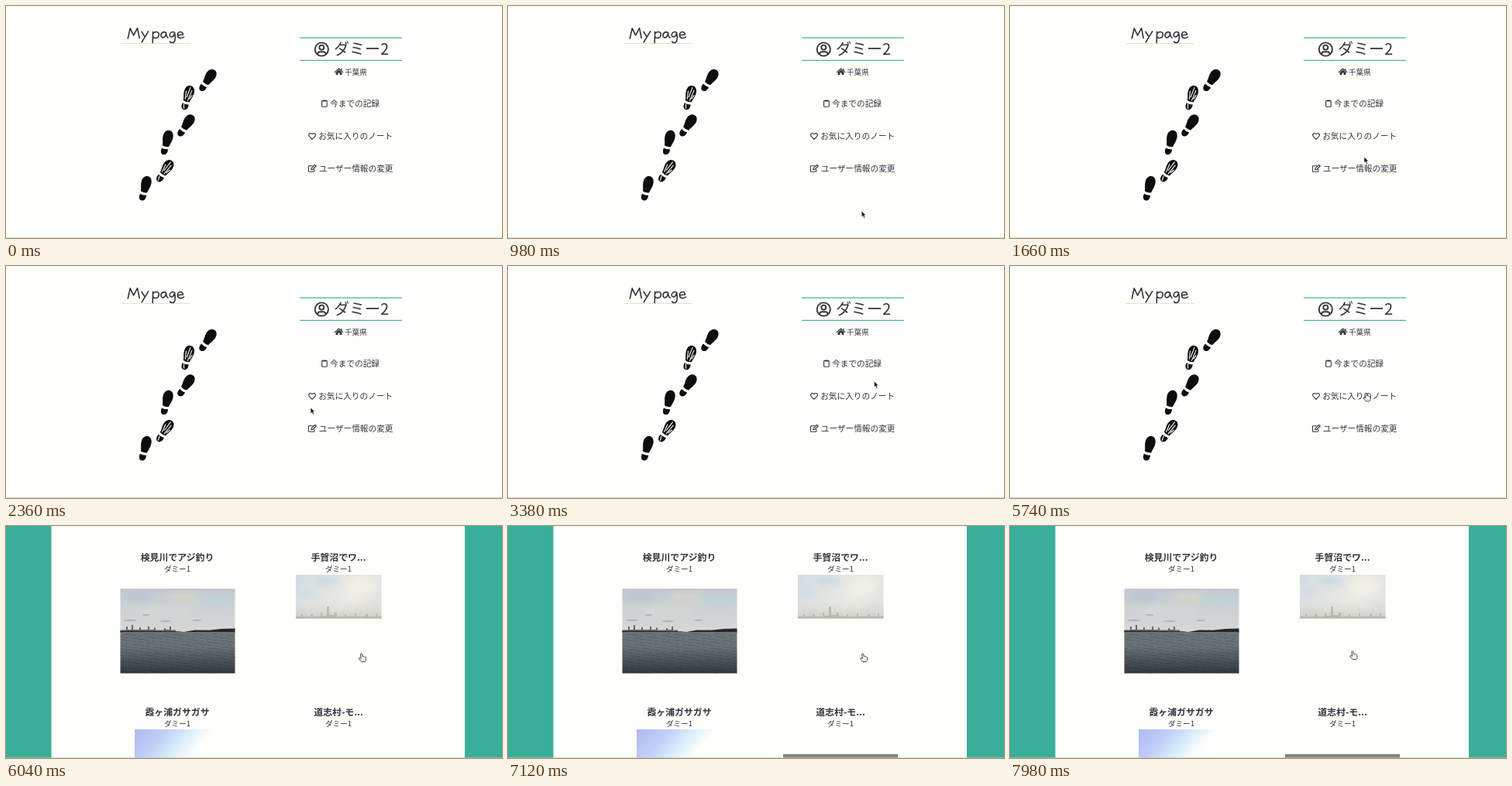
Write an HTML page that moves like this. It is 640 px wide and 300 px high and loops after 8000 ms.

```html
<!DOCTYPE html>
<html lang="ja">
<head>
<meta charset="utf-8">
<title>My page</title>
<style>
  :root { --paper: #fefefb; --text: #34343a; --teal: #39ae98; }
  html, body { margin: 0; width: 100%; height: 100%; overflow: hidden; background: var(--paper); }
  svg { display: block; width: 100%; height: 100%; }
  text { font-family: "Noto Sans CJK JP", "Noto Sans CJK", "Noto Sans", sans-serif; fill: var(--text); }
  .link { font-size: 10.67px; }
  .title { font-size: 11.9px; font-weight: 700; text-anchor: middle; }
  .author { font-size: 9.6px; text-anchor: middle; }
  .ink { fill: none; stroke: var(--text); stroke-linecap: round; stroke-linejoin: round; }
  .solid { fill: var(--text); }
  .paper { fill: var(--paper); }
</style>
</head>
<body>
<svg viewBox="0 0 640 300" xmlns="http://www.w3.org/2000/svg">
  <defs>
    <linearGradient id="sky" x1="0" y1="0" x2="0" y2="1">
      <stop offset="0" stop-color="#c3c8cf"/>
      <stop offset=".45" stop-color="#ced2d2"/>
      <stop offset=".8" stop-color="#d3d4d8"/>
      <stop offset="1" stop-color="#dcd8cf"/>
    </linearGradient>
    <linearGradient id="water" x1="0" y1="0" x2="0" y2="1">
      <stop offset="0" stop-color="#6d7478"/>
      <stop offset=".35" stop-color="#697375"/>
      <stop offset="1" stop-color="#32363a"/>
    </linearGradient>
    <linearGradient id="dusk" x1="0" y1="0" x2="1" y2=".25">
      <stop offset="0" stop-color="#d3dce2"/>
      <stop offset=".45" stop-color="#e2e5e2"/>
      <stop offset=".75" stop-color="#ecebe6"/>
      <stop offset="1" stop-color="#e3e3e3"/>
    </linearGradient>
    <linearGradient id="haze" x1="0" y1="0" x2="0" y2="1">
      <stop offset=".55" stop-color="#e2dfd6" stop-opacity="0"/>
      <stop offset="1" stop-color="#cfccc4"/>
    </linearGradient>
    <linearGradient id="dawn" gradientUnits="userSpaceOnUse" x1="185" y1="221" x2="252" y2="281">
      <stop offset=".15" stop-color="#b0b9f0"/>
      <stop offset=".5" stop-color="#c0cdf8"/>
      <stop offset=".75" stop-color="#d6ecfb"/>
      <stop offset="1" stop-color="#fefefb"/>
    </linearGradient>
    <filter id="soft"><feGaussianBlur stdDeviation="4"/></filter>
    <clipPath id="frame1"><rect x="147.5" y="81" width="148" height="109.5"/></clipPath>
    <clipPath id="frame2"><rect x="374" y="63" width="110.5" height="56.5"/></clipPath>
    <g id="shoe">
      <path d="M-1-16C4-17 7-12 6.6-6.5C6.3-2 4.8 1 4.4 4.6Q0 6.2-3.9 4.8C-4.4 0-6.6-3-6.5-8C-6.3-12.5-4-15.6-1-16Z"/>
      <path d="M-4 8.2Q0 9.4 4.3 8C5.2 12 3.6 16 .2 16.2C-3.4 16.3-4.8 12.4-4 8.2Z"/>
    </g>
    <path id="scratch" d="M-4-8L-2 3M0-14L-1 0M3-11L1.5 4M-2 9L0 15M5-5L3 1"
      fill="none" stroke="#fefefb" stroke-width="1.1"/>
  </defs>

  <rect width="640" height="300" class="paper"/>

  <g id="home">
    <g class="ink" stroke-width="1.6" role="img" aria-label="My page">
      <path d="M157.3 42L160.2 28.8L164.6 37.8L169.6 28.6L172.2 41.5"/>
      <path d="M175 33.3L179 39.6M183.6 32.8L175.2 46.8"/>
      <path d="M189.6 33.4L189.2 47.6M189.7 36C191.5 32.3 197.6 32.6 197.3 37.2C197 42 191.3 42.6 189.6 39.6"/>
      <path d="M206.6 34.6C203.5 32.1 199.6 35 200 38.4C200.5 42.2 205.8 42 206.6 34.6Q206.6 39.6 209 41.2"/>
      <path d="M217.6 34.4C214.4 32 210.8 34.8 211.2 37.8C211.8 41.2 217 40.6 217.6 34.4C219.2 42 218.2 47.8 214.6 47.6Q212.4 47.4 211.6 46"/>
      <path d="M221.6 37.8L228.6 37C228.2 32 221.4 32.6 221.4 37.8C221.5 42.4 226.6 42.4 229.6 40"/>
    </g>
    <path d="M150 48.5H237" stroke="#c9c7a4" stroke-dasharray="1 1"/>
    <g id="steps" fill="#0d0d0d"></g>

    <path d="M379 41.2H511M379 70.4H511" stroke="#4bb595" stroke-width="1.3"/>
    <g class="ink" stroke-width="1.9">
      <circle cx="407.3" cy="56" r="8.6"/>
      <circle cx="407.3" cy="53.6" r="3"/>
      <path d="M401.8 62Q402.8 59.2 405 59.2H409.6Q411.8 59.2 412.8 62"/>
    </g>
    <text x="423" y="63.3" font-size="20">ダミー2</text>

    <path d="M424.2 85.6L429.5 81L434.8 85.6M433 81.4V84" class="ink" stroke-width="1.2"/>
    <path d="M425.6 85.8L429.5 82.5L433.4 85.8V89H430.6V86.4H428.4V89H425.6Z" class="solid"/>
    <text x="437" y="88.5" font-size="9.6">千葉県</text>

    <g class="ink" stroke-width="1.1">
      <rect x="407.6" y="122.3" width="6.6" height="8" rx=".9"/>
      <path d="M409.4 122.6H412.4" stroke-width="1.9"/>
      <path d="M395 172.4L391.4 168.6C389.2 165.8 392.6 162.8 395 165.7C397.4 162.8 400.8 165.8 398.6 168.6Z"/>
      <path d="M396 206.8H391.2Q390.4 206.8 390.4 207.6V213.4Q390.4 214.2 391.2 214.2H397Q397.8 214.2 397.8 213.4V211.4"/>
      <path d="M393.6 211.8L394 209.8L398.6 205.4L400.2 207L395.6 211.5Z"/>
    </g>
    <text class="link" x="418" y="129.8">今までの記録</text>
    <text class="link" x="403.2" y="171.8">お気に入りのノート</text>
    <text class="link" x="403.8" y="213.8">ユーザー情報の変更</text>
  </g>

  <g id="notes">
    <path d="M0 0H58.5V300H0ZM592 0H640V300H592Z" fill="var(--teal)"/>
    <g id="cards"></g>

    <g clip-path="url(#frame1)">
      <rect x="147" y="81" width="149" height="57" fill="url(#sky)"/>
      <g filter="url(#soft)">
        <ellipse cx="270" cy="97" rx="28" ry="7" fill="#c3d3d6"/>
        <ellipse cx="230" cy="92" rx="20" ry="6" fill="#d4d5c9"/>
        <ellipse cx="205" cy="110" rx="34" ry="5" fill="#d4dad8"/>
        <ellipse cx="170" cy="92" rx="22" ry="5" fill="#bcc4d6"/>
      </g>
      <g fill="#a3a4b4" opacity=".7">
        <ellipse cx="160" cy="122" rx="9" ry="1.2"/>
        <ellipse cx="181" cy="115" rx="5" ry="1"/>
        <ellipse cx="206" cy="123" rx="8" ry="1.2"/>
        <ellipse cx="246" cy="122" rx="6" ry="1"/>
      </g>
      <path d="M147 137V134.5H155V130H157V134H162V128H164V134H172V131H174V134H183V130H185V134H191V131.5H193V134.5H204V132H206V134H211V130H213V134.5H219V137Z" fill="#65666b"/>
      <path d="M147 135.6L222 136.2L230 137L244 134.4L262 134.8L278 133L296 132.4V138H147Z" fill="#26272a"/>
      <rect x="147" y="137" width="149" height="54" fill="url(#water)"/>
      <g id="waves" stroke="#1f2328" stroke-opacity=".22"></g>
    </g>

    <g clip-path="url(#frame2)">
      <rect x="374" y="63" width="111" height="57" fill="url(#dusk)"/>
      <g filter="url(#soft)">
        <ellipse cx="413" cy="71" rx="17" ry="5" fill="#c8dae2"/>
        <ellipse cx="386" cy="88" rx="10" ry="5" fill="#d0dce0"/>
        <ellipse cx="458" cy="79" rx="20" ry="11" fill="#f1f0e6"/>
      </g>
      <rect x="374" y="63" width="111" height="57" fill="url(#haze)"/>
      <path d="M374 120V117H381V114H383V117H393V114H396V117H406V112H408V116H414V104H417V115H424V112H427V117H437V114H439V117H450V113H452V117H464V114H467V117H477V113H479V117H485V120Z" fill="#b0aea6" opacity=".7"/>
    </g>

    <rect x="166" y="263" width="110" height="37" fill="url(#dawn)"/>
    <rect id="late" x="355" y="295" width="148" height="5" fill="#85847c"/>
  </g>

  <path d="M0 299.5H640" stroke="#c6c6c0" stroke-opacity=".65"/>

  <g id="pointer">
    <path id="arrow" d="M0 0V7.8L1.8 6.2L3.1 9.2L4.5 8.6L3.2 5.7H5.6Z" fill="#1a1a1a" stroke="#fefefb" stroke-width=".5"/>
    <path id="hand" d="M-1 .8C-.8-.4.9-.4 1.1.8L1.7 3.6L2.4 3.3Q3.3 3 3.6 4Q4.5 3.5 5 4.5Q6 4.3 6.1 5.6C6.3 8 5.9 9.2 4.8 10.6H.4C-.8 9-2.2 8-3 6.6C-3.3 5.6-2 5.1-.2 6.4Z"
      fill="#f3f3ef" stroke="#34343a" stroke-width=".9" stroke-linejoin="round"/>
  </g>
</svg>

<script>
const LOOP = 8000, OPEN_NOTES = 5880, LATE_PHOTO = 6180;
const $ = id => document.getElementById(id);
const show = (el, on) => el.setAttribute('visibility', on ? 'inherit' : 'hidden');

// x, y, turn, worn
const steps = [
  [260, 96, 34], [234, 118.5, 17, 1], [232, 154.5, 34],
  [207, 176.5, 15], [204.8, 213.3, 34, 1], [179, 235.8, 15]
];
$('steps').innerHTML = steps.map(([x, y, turn, worn]) =>
  `<g transform="translate(${x} ${y}) rotate(${turn})"><use href="#shoe"/>${worn ? '<use href="#scratch"/>' : ''}</g>`
).join('');

const cards = [
  [221, 40, '検見川でアジ釣り'], [429, 40, '手賀沼でワ...'],
  [221, 240.5, '霞ヶ浦ガサガサ'], [429, 240.5, '道志村-モ...']
];
$('cards').innerHTML = cards.map(([x, y, title]) =>
  `<text class="title" x="${x}" y="${y + 4.5}">${title}</text>` +
  `<text class="author" x="${x}" y="${y + 18.6}">ダミー1</text>`
).join('');

$('waves').innerHTML = Array.from({ length: 220 }, (_, i) => {
  const x = 143 + (i * 61.8) % 150, y = 139 + i * 0.235;
  return `<path d="M${x.toFixed(1)} ${y.toFixed(1)}h${4 + i % 7}"/>`;
}).join('');

// time, x, y of the pointer's tip
const path = [
  [20, 503, 301], [400, 482, 291], [820, 458, 279], [1240, 455, 232], [1560, 457, 195],
  [1660, 457, 195], [1900, 430, 206], [2150, 369, 190], [2260, 376, 174], [2360, 393, 183],
  [2500, 382, 183], [2640, 363, 172], [2900, 420, 146], [3080, 455, 140], [3240, 475, 146],
  [3380, 472.5, 149], [3700, 470, 160], [3900, 457, 164.5], [4080, 463.5, 164], [4180, 464, 164],
  [4400, 451.5, 162], [4740, 459, 164.3], [5760, 459, 164.3], [6040, 458.3, 165],
  [7160, 457.5, 165], [7980, 441.8, 162], [8000, 441.8, 162]
];

const rate = (i, k) => (path[i + 1][k] - path[i][k]) / (path[i + 1][0] - path[i][0]);

// Slope at a key; zero at turning points, so the curve never overshoots
function slope(i, k) {
  if (i === 0 || i === path.length - 1) return 0;
  const a = rate(i - 1, k), b = rate(i, k);
  return a * b <= 0 ? 0 : 2 * a * b / (a + b);
}

function along(t, k) {
  let i = 0;
  while (i < path.length - 2 && t >= path[i + 1][0]) i++;
  const span = path[i + 1][0] - path[i][0];
  const u = Math.max(0, Math.min(1, (t - path[i][0]) / span));
  const v = 1 - u;
  return v * v * (1 + 2 * u) * path[i][k] + u * u * (3 - 2 * u) * path[i + 1][k]
    + span * u * v * (v * slope(i, k) - u * slope(i + 1, k));
}

const overLink = (x, y) =>
  x > 389 && x < 500 && [126, 168, 210].some(row => Math.abs(y - row) < 7);

function draw(t) {
  const notes = t >= OPEN_NOTES;
  show($('home'), !notes);
  show($('notes'), notes);
  show($('late'), notes && t >= LATE_PHOTO);

  const x = along(t, 1), y = along(t, 2), hand = notes || overLink(x, y);
  $('pointer').setAttribute('transform', `translate(${x.toFixed(2)} ${y.toFixed(2)})`);
  show($('pointer'), t >= 20);
  show($('arrow'), !hand);
  show($('hand'), hand);
}

function tick() {
  draw(performance.now() % LOOP);
  requestAnimationFrame(tick);
}
tick();
</script>
</body>
</html>
```
